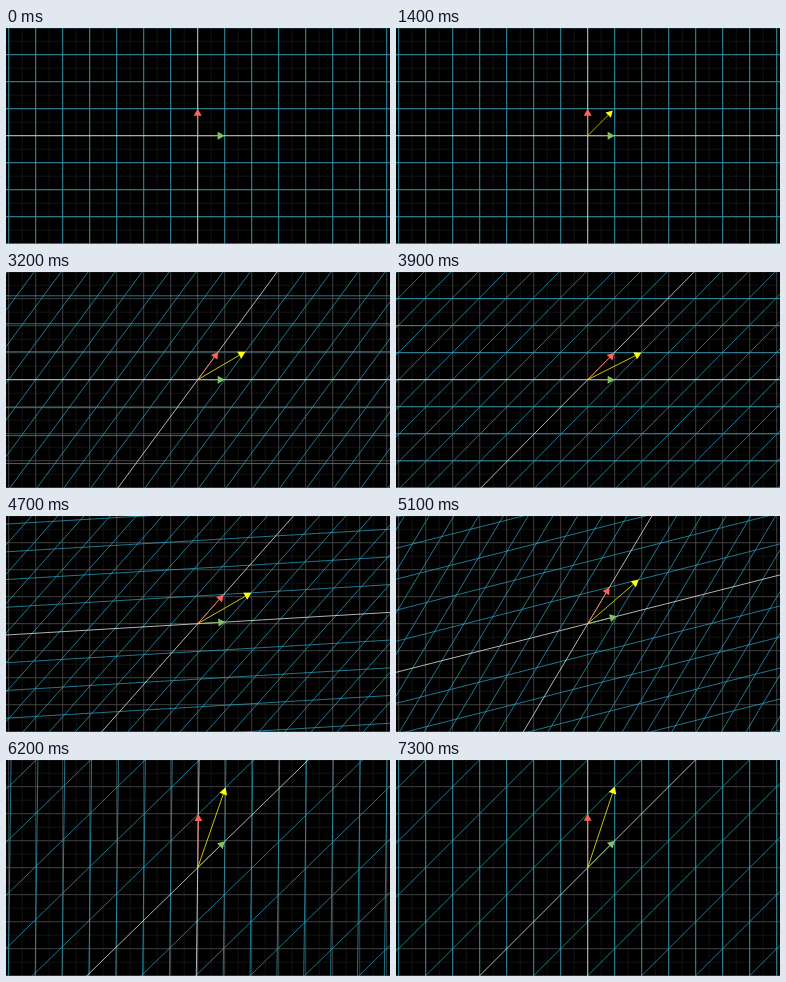
Recreate the animation shown at these times as an HTML page with a canvas. Size 384 by 216 pixels, loop 7400 ms.

```html
<!DOCTYPE html>
<html lang="en">
<head>
<meta charset="utf-8">
<title>Linear transformations of the plane</title>
<style>
  html, body { margin: 0; width: 100%; height: 100%; overflow: hidden; background: #000; }
  canvas { display: block; width: 100%; height: 100%; }
</style>
</head>
<body>
<canvas id="stage" width="384" height="216"></canvas>
<script>
const ctx = document.getElementById('stage').getContext('2d');
const W = 384, H = 216, UNIT = 27;
const CENTER_X = W / 2 - 0.3, CENTER_Y = H / 2 - 0.3;
const LOOP = 7400, STEP = 100;
const GROW_START = 800, GROW_TIME = 800;
const SHEAR_START = 1725, MOVE_TIME = 2400;
const ROTATE_START = SHEAR_START + MOVE_TIME;
const THIN = 0.7;

const clamp = x => Math.min(1, Math.max(0, x));
const sigmoid = x => 1 / (1 + Math.exp(-x));

// Normalised logistic easing
function smooth(s) {
  const edge = sigmoid(-5);
  return clamp((sigmoid(10 * (clamp(s) - 0.5)) - edge) / (1 - 2 * edge));
}
const progress = (t, start, duration) => smooth((t - start) / duration);

// Point at fraction a of the circular arc with the given angle between two points
function alongArc([x0, y0], [x1, y1], angle, a) {
  const k = 0.5 / Math.tan(angle / 2);
  const cx = (x0 + x1) / 2 - (y1 - y0) * k;
  const cy = (y0 + y1) / 2 + (x1 - x0) * k;
  const c = Math.cos(a * angle), s = Math.sin(a * angle);
  const dx = x0 - cx, dy = y0 - cy;
  return [cx + c * dx - s * dy, cy + s * dx + c * dy];
}

function basisAt(t) {
  if (t < ROTATE_START) {
    const a = progress(t, SHEAR_START, MOVE_TIME);
    return { i: [1, 0], j: alongArc([0, 1], [1, 1], -Math.PI / 8, a) };
  }
  const a = progress(t, ROTATE_START, MOVE_TIME);
  return {
    i: alongArc([1, 0], [1, 1], Math.PI / 4, a),
    j: alongArc([1, 1], [0, 2], Math.PI / 4, a)
  };
}

const combine = ({ i, j }, x, y) => [x * i[0] + y * j[0], x * i[1] + y * j[1]];
const toScreen = ([x, y]) => [CENTER_X + x * UNIT, CENTER_Y - y * UNIT];

function line(from, to, color, width) {
  ctx.strokeStyle = color;
  ctx.lineWidth = width;
  ctx.beginPath();
  ctx.moveTo(...toScreen(from));
  ctx.lineTo(...toScreen(to));
  ctx.stroke();
}

function grid(basis, spacing, color, width) {
  const reach = 16;
  for (let k = -reach; k <= reach; k += spacing) {
    if (k === 0) continue;
    line(combine(basis, k, -reach), combine(basis, k, reach), color, width);
    line(combine(basis, -reach, k), combine(basis, reach, k), color, width);
  }
}

function axes(basis, color, width) {
  line(combine(basis, -16, 0), combine(basis, 16, 0), color, width);
  line(combine(basis, 0, -16), combine(basis, 0, 16), color, width);
}

function arrow([x, y], color, scale = 1) {
  if (scale < 0.005) return;
  const length = Math.hypot(x, y) * UNIT, tip = 7, half = 4;
  ctx.save();
  ctx.translate(CENTER_X, CENTER_Y);
  ctx.rotate(-Math.atan2(y, x));
  ctx.scale(scale, scale);
  ctx.strokeStyle = ctx.fillStyle = color;
  ctx.lineWidth = THIN;
  ctx.beginPath();
  ctx.moveTo(0, 0);
  ctx.lineTo(length - tip, 0);
  ctx.stroke();
  ctx.beginPath();
  ctx.moveTo(length, 0);
  ctx.lineTo(length - tip, half);
  ctx.lineTo(length - tip, -half);
  ctx.fill();
  ctx.restore();
}

const STANDARD = { i: [1, 0], j: [0, 1] };

function draw(t) {
  const basis = basisAt(t);
  ctx.fillStyle = '#000';
  ctx.fillRect(0, 0, W, H);
  grid(STANDARD, 0.5, '#1c1c1c', THIN);
  grid(STANDARD, 1, '#505050', THIN);
  axes(STANDARD, '#606060', THIN);
  grid(basis, 1, '#29abca', THIN);
  axes(basis, '#fff', THIN);
  arrow(basis.i, '#83c167');
  arrow(basis.j, '#fc6255');
  arrow(combine(basis, 1, 1), '#ffff00', progress(t, GROW_START, GROW_TIME));
}

const began = performance.now();
function frame() {
  const t = (performance.now() - began) % LOOP;
  draw(Math.floor(t / STEP) * STEP);
  requestAnimationFrame(frame);
}
frame();
</script>
</body>
</html>
```
